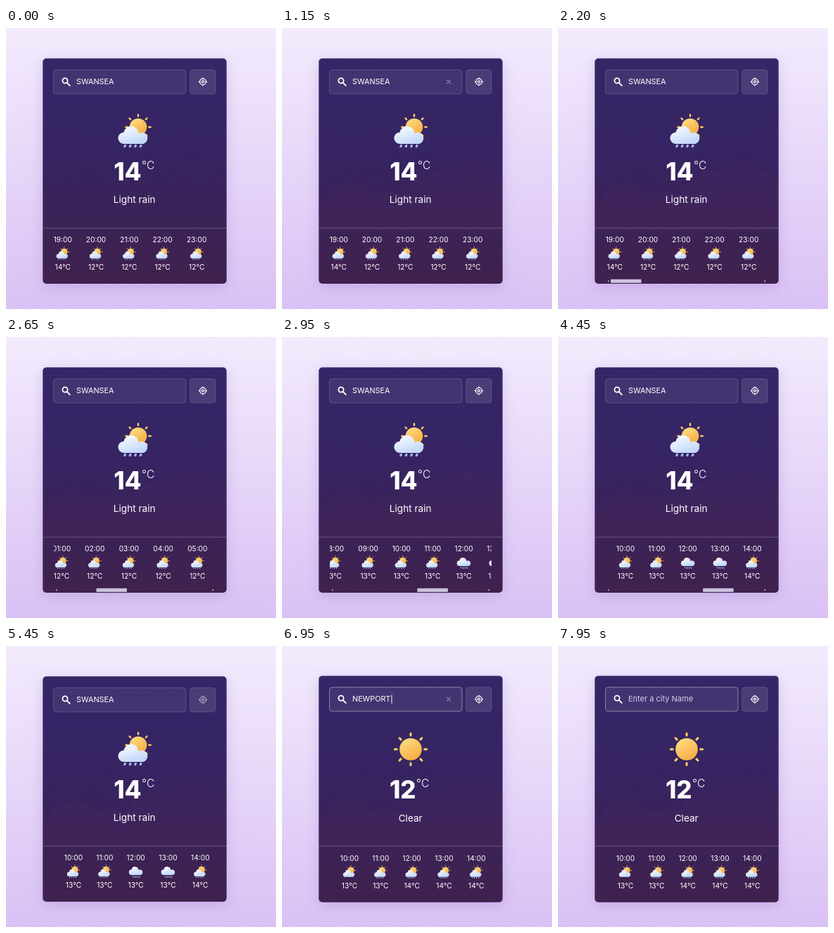
Animation, 384 px wide and 400 px high, one loop 8 s. Source, as an HTML page:

```html
<!DOCTYPE html>
<html lang="en">
<head>
<meta charset="utf-8">
<title>Weather card</title>
<style>
  html, body { margin: 0; width: 100%; height: 100%; overflow: hidden; }
  svg { display: block; width: 100%; height: 100%; font-family: Inter, "Open Sans", sans-serif; fill: #fff; }
  .shadow { filter: drop-shadow(0 4px 9px rgba(90, 50, 170, .18)); }
  .field { font-size: 10.8px; }
  .hint { font-size: 11px; fill: #d6cce9; }
  .hour { font-size: 10.2px; text-anchor: middle; }
  .degrees { font-size: 35px; font-weight: 800; text-anchor: end; }
  .unit { font-size: 15.5px; font-weight: 300; }
  .summary { font-size: 13.6px; text-anchor: middle; }
  .line { fill: none; stroke: #fff; stroke-linecap: round; }
</style>
</head>
<body>
<svg viewBox="0 0 384 400">
  <defs>
    <linearGradient id="page" x2="0" y2="1"><stop stop-color="#f3ebfd"/><stop offset="1" stop-color="#d9c1f4"/></linearGradient>
    <linearGradient id="night" x2="0" y2="1">
      <stop stop-color="#352668"/><stop offset=".4" stop-color="#362463"/><stop offset="1" stop-color="#3f214d"/>
    </linearGradient>
    <linearGradient id="gold" x2=".6" y2="1"><stop stop-color="#ffe285"/><stop offset="1" stop-color="#f6ad45"/></linearGradient>
    <linearGradient id="vapor" x2=".5" y2="1"><stop stop-color="#fff"/><stop offset="1" stop-color="#c3d8fa"/></linearGradient>
    <clipPath id="window"><rect x="68" y="290" width="230" height="66"/></clipPath>

    <g id="sun"><circle r="15.8" fill="url(#gold)"/><g id="rays" stroke="#ffd263" stroke-width="3" stroke-linecap="round"/></g>
    <path id="cloud" fill="url(#vapor)" d="M-15 18a8.3 8.3 0 0 1-.5-16.6a10.6 10.6 0 0 1 21 1.6a8.2 8.2 0 1 1 4.5 15z"/>
    <path id="drops" d="M-13.5 20.4l-.8 1.4M-6 20.4l-.8 1.4M1.5 20.4l-.8 1.4M9 20.4l-.8 1.4" stroke="#a9bdf4" stroke-width="3" stroke-linecap="round"/>
    <g id="partly"><use href="#sun" transform="translate(5 -6) scale(.78)"/><use href="#cloud"/></g>
    <g id="showers"><use href="#partly"/><use href="#drops"/></g>
    <g id="rain"><use href="#cloud" transform="translate(3 -9) scale(1.2)"/><use href="#drops" transform="translate(3 -3)"/><use href="#drops" transform="translate(6 2) scale(.9)"/></g>
  </defs>

  <rect width="384" height="400" fill="url(#page)"/>
  <rect id="card" class="shadow" x="52.3" width="261.4" rx="5" fill="url(#night)"/>
  <path id="clouds" fill="#8c3a6c" fill-opacity=".06"
    d="M52.3 246H62Q66 224 93 223Q118 223 125 238Q150 232 172 236Q184 210 212 207Q226 201 239 206Q244 192 265 192Q285 193 289 206Q302 203 313.7 208V285H52.3Z"/>
  <path d="M52.3 285H313.7" stroke="#fff" stroke-opacity=".24"/>

  <g id="header">
    <rect id="input" x="67.5" y="59.5" width="188.5" height="34.3" rx="4" fill="#fff" fill-opacity=".065" stroke="#fff"/>
    <rect x="261.7" y="59.5" width="36.3" height="34.3" rx="4" fill="#fff" fill-opacity=".1" stroke="#fff" stroke-opacity=".15"/>
    <path class="line" stroke-width="1.8" d="M87 78.2l3.8 3.8M87.6 75a3.6 3.6 0 1 0-7.2 0a3.6 3.6 0 1 0 7.2 0"/>
    <text id="city" x="100" y="80.3" class="field"></text>
    <text id="hint" x="100" y="80.3" class="hint">Enter a city Name</text>
    <path id="caret" stroke="#fff" d="M156 70.5v12"/>
    <path id="clear" class="line" stroke-opacity=".3" stroke-width="1.6" d="M234.5 74l5 5m0-5l-5 5"/>
    <g id="locate" class="line" stroke-width="1.3" transform="translate(280 76.5)">
      <circle r="4.3"/><circle r="1.6"/><path d="M0-5.6v.8M0 5.6v-.8M-5.6 0h.8M5.6 0h-.8"/>
    </g>
  </g>

  <use id="icon" x="183" y="147"/>
  <g id="body">
    <text id="degrees" y="216.6" class="degrees"></text>
    <text id="unit" y="200.6" class="unit">°C</text>
    <text id="summary" x="182.7" y="248.8" class="summary"></text>
    <g clip-path="url(#window)"><g id="hours"></g></g>
  </g>

  <g id="scrollbar" fill="#cbc3de">
    <path d="M72.5 358.8v3l-2-1.5zM293.5 358.8v3l2-1.5z"/>
    <rect id="thumb" y="357.7" width="43.5" height="5.2"/>
  </g>
</svg>
<script>
const $ = id => document.getElementById(id);
const LOOP = 8000, GAP = 20.2, MAX_SCROLL = 926.7, REST_SCROLL = 706.6;
const LOADED = 5700, FOCUS = 6300, CLEARED = 7050;

$('rays').innerHTML = Array.from({ length: 8 }, (_, i) =>
  `<path d="M0-19.7v-2.9" transform="rotate(${i * 45})"/>`).join('');

const swansea = {
  city: 'SWANSEA', degrees: 14, summary: 'Light rain', icon: 'showers', right: 192.7,
  temp: h => h >= 14 && h <= 16 ? 14 : h >= 6 && h <= 17 ? 13 : 12,
  hourIcon: h => h === 12 || h === 13 ? 'rain' : 'showers'
};
const newport = {
  city: 'NEWPORT', degrees: 12, summary: 'Clear', icon: 'sun', right: 190.7,
  temp: h => h >= 12 && h <= 16 ? 14 : 13,
  hourIcon: h => h === 10 ? 'partly' : 'showers'
};

// Hour columns run from 19:00 to 19:00 the next day; a "1" makes a column narrower.
function hourList(place) {
  let left = 68, html = '';
  for (let i = 0; i < 25; i++) {
    const h = (19 + i) % 24, label = String(h).padStart(2, '0');
    const width = 28.5 - 2.9 * (label.split('1').length - 1);
    const x = left + width / 2;
    const icon = i === 24 ? 'sun' : place.hourIcon(h);
    const temp = i === 0 ? place.degrees : place.temp(h);
    html += `<text class="hour" x="${x}" y="305">${label}:00</text>
      <use href="#${icon}" transform="translate(${x} 321) scale(.39)"/>
      <text class="hour" x="${x}" y="344.3">${temp}°C</text>`;
    left += width + GAP;
  }
  return html;
}

let shown;
function show(place) {
  if (place === shown) return;
  shown = place;
  for (const id of ['city', 'degrees', 'summary']) $(id).textContent = place[id];
  $('degrees').setAttribute('x', place.right);
  $('unit').setAttribute('x', place.right + .4);
  $('icon').setAttribute('href', '#' + place.icon);
  $('hours').innerHTML = hourList(place);
  const grow = place === newport ? .8 : 0;
  $('card').setAttribute('y', 43.2 - grow);
  $('card').setAttribute('height', 320.7 + 2 * grow);
  $('header').setAttribute('transform', `translate(0 ${-grow})`);
  $('body').setAttribute('transform', `translate(0 ${grow})`);
}

const scrollKeys = [[2400, 0], [3207, MAX_SCROLL], [3600, MAX_SCROLL], [3750, 885], [3900, 885], [4300, REST_SCROLL]];
function scrollAt(t) {
  if (t <= scrollKeys[0][0]) return 0;
  const next = scrollKeys.findIndex(key => key[0] > t);
  if (next < 0) return REST_SCROLL;
  const [[t0, s0], [t1, s1]] = [scrollKeys[next - 1], scrollKeys[next]];
  return s0 + (s1 - s0) * (t - t0) / (t1 - t0);
}

const visible = (id, on) => $(id).style.display = on ? '' : 'none';
const between = (t, from, to) => t >= from && t < to;

function draw(now) {
  const t = now % LOOP, scroll = scrollAt(t), empty = t >= CLEARED;
  show(t < LOADED ? swansea : newport);
  $('clouds').style.opacity = Math.min(1, t / 500);
  $('hours').setAttribute('transform', `translate(${-scroll} 0)`);
  $('thumb').setAttribute('x', 75 + 172 * scroll / MAX_SCROLL);
  $('input').setAttribute('stroke-opacity', t >= FOCUS ? .4 : .16);
  $('locate').style.opacity = between(t, 5450, LOADED) ? .55 : 1;
  $('caret').setAttribute('transform', `translate(${empty ? -56 : 0} 0)`);
  visible('scrollbar', between(t, 2000, 4500));
  visible('clear', between(t, 750, 1350) || between(t, FOCUS, CLEARED));
  visible('caret', between(t, FOCUS, 6700) || between(t, 6950, 7400));
  visible('city', !empty);
  visible('hint', empty);
}

function frame() {
  draw(performance.now());
  requestAnimationFrame(frame);
}
frame();
</script>
</body>
</html>
```
